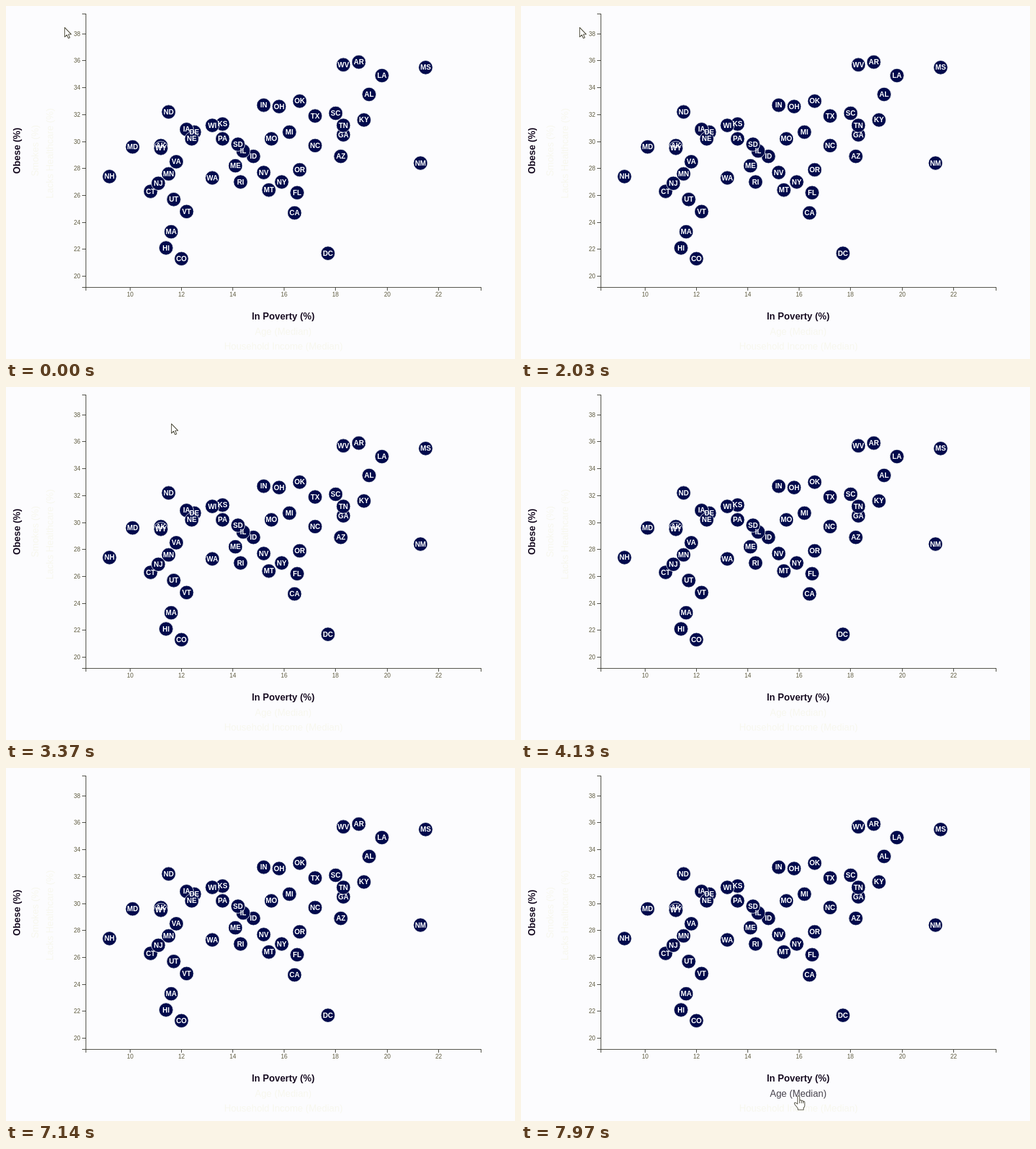
An HTML page that plays this animation: 863 by 599 pixels, repeating every 8 s.

```html
<!DOCTYPE html>
<html lang="en">
<head>
<meta charset="utf-8">
<title>Scatter plot</title>
<style>
  html, body { margin: 0; width: 100%; height: 100%; overflow: hidden; background: #fcfcfe; }
  svg { display: block; font-family: "Liberation Sans", Arial, sans-serif; cursor: default; }
  .axis { fill: none; stroke: #333329; shape-rendering: crispEdges; }
  .tick { font-size: 10px; fill: #5c583c; }
  .dot { fill: #000a4c; stroke: #e3e6ea; }
  .code { font-size: 12px; font-weight: bold; fill: #fff; text-anchor: middle; }
  .label { font-size: 16px; text-anchor: middle; fill: #f7f7ee; }
  .label.on { font-weight: bold; fill: #1a0f24; }
  .label.hover { fill: #48444e; }
  .cursor { fill: #fff; stroke: #4a4838; stroke-width: 1.1; stroke-linejoin: round; stroke-linecap: round; }
</style>
</head>
<body>
<svg id="stage" width="863" height="599" viewBox="0 0 863 599"></svg>
<script>
const LOOP = 8000, FPS = 30;
const stage = document.getElementById('stage');

// code, poverty %, obesity %
const states = `AL 19.3 33.5,AK 11.2 29.7,AZ 18.2 28.9,AR 18.9 35.9,CA 16.4 24.7,CO 12 21.3,
CT 10.8 26.3,DE 12.5 30.7,DC 17.7 21.7,FL 16.5 26.2,GA 18.3 30.5,HI 11.4 22.1,ID 14.8 28.9,
IL 14.4 29.3,IN 15.2 32.7,IA 12.2 30.9,KS 13.6 31.3,KY 19.1 31.6,LA 19.8 34.9,ME 14.1 28.2,
MD 10.1 29.6,MA 11.6 23.3,MI 16.2 30.7,MN 11.5 27.6,MS 21.5 35.5,MO 15.5 30.2,MT 15.4 26.4,
NE 12.4 30.2,NV 15.2 27.7,NH 9.2 27.4,NJ 11.1 26.9,NM 21.3 28.4,NY 15.9 27,NC 17.2 29.7,
ND 11.5 32.2,OH 15.8 32.6,OK 16.6 33,OR 16.6 27.9,PA 13.6 30.2,RI 14.3 27,SC 18 32.1,
SD 14.2 29.8,TN 18.3 31.2,TX 17.2 31.9,UT 11.7 25.7,VT 12.2 24.8,VA 11.8 28.5,WA 13.2 27.3,
WV 18.3 35.7,WI 13.2 31.2,WY 11.2 29.5`.split(',').map(s => s.trim().split(' '));

const px = v => 210.3 + (v - 10) * 43.58;
const py = v => 47.2 + (38 - v) * 22.85;

function add(tag, attrs, text) {
  const el = document.createElementNS('http://www.w3.org/2000/svg', tag);
  for (const key in attrs) el.setAttribute(key, attrs[key]);
  if (text) el.textContent = text;
  return stage.appendChild(el);
}

function label(text, x, y, cls = '', turn = 0) {
  return add('text', { class: 'label ' + cls, transform: `translate(${x},${y}) rotate(${turn})` }, text);
}

function drawAxes() {
  let d = 'M129 13.5H135.5V477.5H129M135.5 483V477.5H805.5V483';
  for (let v = 10; v <= 22; v += 2) {
    const x = Math.floor(px(v)) + 0.5;
    d += `M${x} 477V483`;
    add('text', { class: 'tick', x, y: 493, 'text-anchor': 'middle' }, String(v));
  }
  for (let v = 20; v <= 38; v += 2) {
    const y = Math.floor(py(v)) + 0.5;
    d += `M129 ${y}H135`;
    add('text', { class: 'tick', x: 126, y: y + 3.2, 'text-anchor': 'end' }, String(v));
  }
  add('path', { class: 'axis', d });
}

drawAxes();
for (const [, x, y] of states) add('circle', { class: 'dot', cx: px(x), cy: py(y), r: 11.9 });
for (const [code, x, y] of states) add('text', { class: 'code', x: px(x), y: py(y) + 4 }, code);

label('Obese (%)', 24, 245.5, 'on', -90);
label('Smokes (%)', 55, 245.5, '', -90);
label('Lacks Healthcare (%)', 80, 250, '', -90);
label('In Poverty (%)', 470, 532, 'on');
const age = label('Age (Median)', 470, 557.5);
const income = label('Household Income (Median)', 470.5, 583);

const arrow = add('path', { class: 'cursor', d: 'M.5.5V16.5L4.2 13 6.7 18.8 9.2 17.7 6.8 12H11.6Z' });
const hand = add('path', {
  class: 'cursor',
  d: 'M-2 14V2Q-2 .5-.3.5T1.5 2V8Q3.5 6.6 4.7 8.6 6.7 7.7 7.5 9.6 10 9.2 10 12V17Q10 19 8 21V24H-1.5V21.5' +
     'L-6 16Q-8.2 13-7 12-5.4 11-3.4 13.4ZM1.5 8V12.5M4.7 8.6V12.5M7.5 9.6V12.5'
});

// pointer keys: ms, x, y; one run per visible stretch
const runs = [
  { end: 3760, keys: [[0, 99, 36], [2567, 99, 36], [2767, 157, 24], [2933, 207, 39], [3133, 253, 55],
    [3400, 284, 63], [3600, 284, 63], [3733, 775, 208]] },
  { end: LOOP, keys: [[7133, 452, 600], [7300, 447, 578], [7467, 446, 558], [7633, 455, 556],
    [7800, 464, 558], [7967, 471, 555.5]] }
];

function pointer(t) {
  const run = runs.find(r => t >= r.keys[0][0] && t < r.end);
  if (!run) return null;
  const next = run.keys.findIndex(k => k[0] > t);
  if (next < 0) return run.keys[run.keys.length - 1].slice(1);
  const [t0, x0, y0] = run.keys[next - 1], [t1, x1, y1] = run.keys[next];
  const f = (t - t0) / (t1 - t0);
  return [x0 + (x1 - x0) * f, y0 + (y1 - y0) * f];
}

function place(el, pos) {
  el.style.display = pos ? '' : 'none';
  if (pos) el.setAttribute('transform', `translate(${pos.map(Math.round)})`);
}

function draw(ms) {
  const t = Math.floor((ms % LOOP + 4) * FPS / 1000) * 1000 / FPS;
  const pos = pointer(t);
  const overAge = !!pos && pos[1] > 543 && pos[1] < 563;
  const overIncome = !!pos && pos[1] > 568 && pos[1] < 588;
  age.classList.toggle('hover', overAge);
  income.classList.toggle('hover', overIncome);
  const over = overAge || overIncome;
  place(arrow, over ? null : pos);
  place(hand, over ? pos : null);
}

const start = performance.now();
function loop() {
  draw(performance.now() - start);
  requestAnimationFrame(loop);
}
loop();
</script>
</body>
</html>
```
